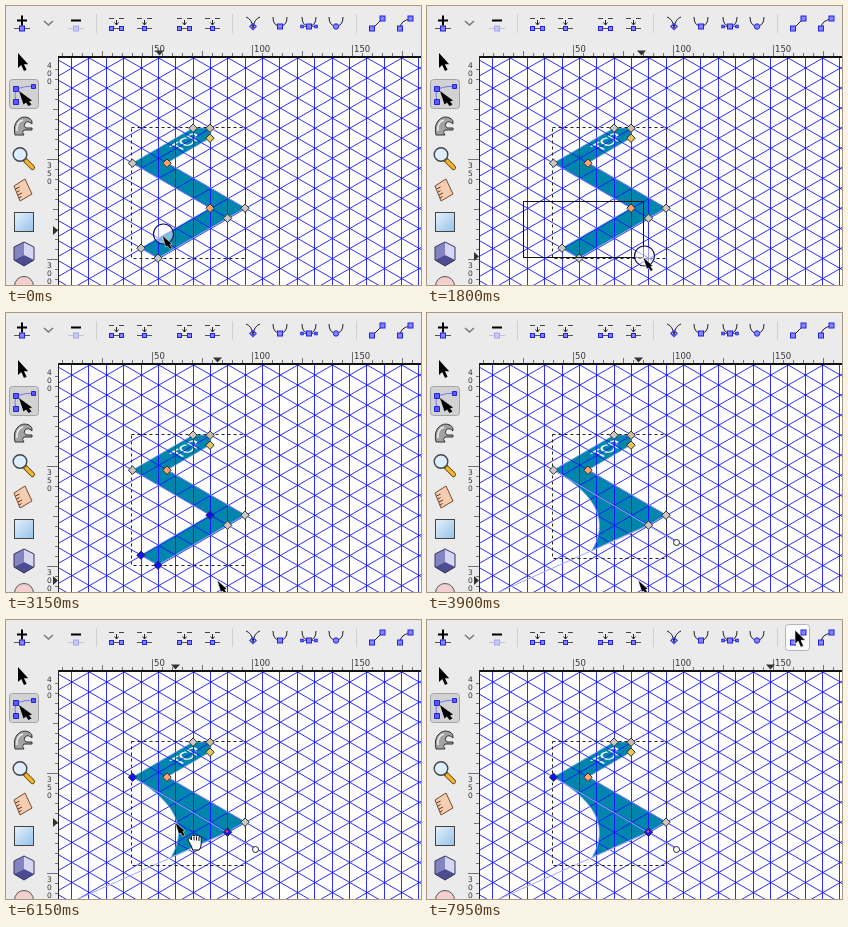
Write an HTML page that moves like this. It is 415x279 px and loops after 8000 ms.

```html
<!DOCTYPE html>
<html lang="en">
<head>
<meta charset="utf-8">
<title>Editing nodes on an axonometric grid</title>
<style>
html, body { margin: 0; width: 100%; height: 100%; overflow: hidden; background: #ebebeb; }
svg { display: block; width: 415px; height: 279px; }
text { font-family: "DejaVu Sans", sans-serif; }
</style>
</head>
<body>
<svg id="stage" viewBox="0 0 415 279" xmlns="http://www.w3.org/2000/svg">
  <defs>
    <clipPath id="view"><rect x="53" y="51" width="362" height="228"/></clipPath>
    <linearGradient id="sky" x2="1" y2="1"><stop stop-color="#e6f1fb"/><stop offset="1" stop-color="#94c2ea"/></linearGradient>
  </defs>
  <rect width="415" height="279" fill="#ebebeb"/>
  <rect x="53" y="51" width="362" height="228" fill="#fff"/>
  <g clip-path="url(#view)">
    <path id="ribbon" fill="#0085ad"/>
    <text transform="matrix(.87 -.5 .87 .5 185 138.700)" text-anchor="middle" font-size="15" fill="#fff" stroke="#fff" stroke-width=".3">TCP</text>
    <path id="grid" fill="none" stroke="#1212ff" stroke-opacity=".88"/>
    <path id="outline" fill="none" stroke="#8fa2f2" stroke-opacity=".75"/>
    <g id="handles" fill="none" stroke="#a3a6f5">
      <path d="M126.500 157L249 229M222 212L62 283.500"/>
      <circle cx="249.500" cy="229.500" r="3" fill="#fff" stroke="#222"/>
    </g>
    <rect id="bounds" x="125.500" y="121.500" width="114" fill="none" stroke="#222" stroke-dasharray="3 3"/>
    <g id="nodes"></g>
    <rect id="band" x="96.500" y="195.500" fill="none" stroke="#111"/>
  </g>
  <g id="rulers"></g>
  <path id="markX" d="M-4.500 -5.500h9l-4.500 5z" fill="#333"/>
  <path id="markY" d="M-5 -4.500v9l5 -4.500z" fill="#333"/>
  <g id="bar"></g>
  <g id="tools">
    <path d="M12 47v15l3.200 -3 2.800 6 2.600 -1.200 -2.700 -5.600h4.300z" fill="#000"/>
    <rect x="3.500" y="73.500" width="29" height="29" rx="3" fill="#d2d2d2" stroke="#a4a4a4"/>
    <path d="M10 96q-2 -7 0 -13q9 -3 18 -3" fill="none" stroke="#7777e8"/>
    <path d="M7.500 80.500h5v5h-5zM25.500 78.500h4v4h-4zM7.500 93.500h5v5h-5z" fill="#5a5aff" stroke="#2222d0"/>
    <path d="M13 85l13 9.500 -3 1 2.500 3 -3 1.500 -2.500 -3.500 -2.500 2z" fill="#000"/>
    <path d="M9 129q-2 -9 2 -14q5 -6 12 -3q4 2 3 6q-4 -4 -7 -1q-2 3 1 5h6v2h-8q-3 2 0 5z" fill="#a2a2a2" stroke="#333"/>
    <path d="M11 125q-1 -9 6 -11" fill="none" stroke="#eee" stroke-width="1.500"/>
    <path d="M19 154l7.500 7.500" stroke="#5f4510" stroke-width="5" stroke-linecap="round"/>
    <path d="M20 155l6.500 6.500" stroke="#f4b62c" stroke-width="3.200" stroke-linecap="round"/>
    <circle cx="14" cy="148.500" r="6.800" fill="#dceeff" stroke="#444" stroke-width="1.400"/>
    <path d="M8 180l11 -7 7 15 -12 7z" fill="#f5cdb0" stroke="#7b4a2c"/>
    <path d="M9.500 183l4 -2M11 186l2.500 -1.500M12 189l4 -2M13 192l2.500 -1.500" stroke="#5d3520"/>
    <rect x="8.500" y="206.500" width="19" height="19" fill="url(#sky)" stroke="#444"/>
    <path d="M18 236l10 5v13l-10 6 -10 -6v-13z" fill="#d6d6f2"/>
    <path d="M18 236v13l-10 5v-13z" fill="#8484c0"/>
    <path d="M18 249l10 5 -10 6 -10 -6z" fill="#4c4c90"/>
    <path d="M18 236l10 5v13l-10 6 -10 -6v-13z" fill="none" stroke="#34345c"/>
    <circle cx="18" cy="280" r="9.500" fill="#f4cfcf" stroke="#555"/>
  </g>
  <circle id="press" r="10" fill="#fff" fill-opacity=".5" stroke="#15155e" stroke-width="1.200"/>
  <g id="cursor">
    <path id="dart" d="M0 0L10 9 7.800 9.600 10 13 7.800 14.300 5.600 11 3.800 12z" fill="#000" stroke="#fff" stroke-width=".5"/>
    <path id="hand" d="M14 20q-2 -4 .5 -4l2 2v-4q1.200 -2 2.500 0q1.200 -2 2.500 0q1.500 -1.500 2.500 .5q2.200 -1 2.200 1.500v6q0 3 -2 6h-6.500q-1 -4 -3.700 -8zM19 14.500v4M21.500 14.500v4M24 15v4" fill="#fff" stroke="#111"/>
    <path id="pointer" d="M0 0v14l3.200 -2.800 2.500 6 2.800 -1.200 -2.500 -5.700h4.500z" fill="#000" stroke="#fff" stroke-width=".6"/>
  </g>
</svg>
<script>
const LOOP = 8000, STEP = 150;
const $ = id => document.getElementById(id);
const set = (el, attrs) => { for (const k in attrs) el.setAttribute(k, attrs[k]); return el; };
const add = (parent, tag, attrs) =>
  parent.appendChild(set(document.createElementNS("http://www.w3.org/2000/svg", tag), attrs));
const show = (id, on) => $(id).setAttribute("visibility", on ? "visible" : "hidden");
const move = (id, x, y) => $(id).setAttribute("transform", `translate(${x} ${y})`);

function drawGrid() {
  const dx = 17.36, dy = 20.05, slope = dy / dx / 2;
  let d = "";
  for (let x = 152.4 - 5 * dx; x < 415; x += dx) d += `M${Math.floor(x) + .5} 51V279`;
  for (let i = -28; i < 16; i++) {
    const y = 242.5 + i * dy;
    for (const s of [slope, -slope]) d += `M53 ${y - 82.5 * s}L415 ${y + 279.5 * s}`;
  }
  $("grid").setAttribute("d", d);
}

function drawRulers() {
  const g = $("rulers"), label = { fill: "#333" };
  let d = "";
  for (let i = -9; i < 28; i++) {
    const len = i % 10 === 0 ? 11 : i % 5 === 0 ? 5 : 3;
    d += `M${146.5 + i * 10} 50v${-len}`;
    if (i < 13) d += `M52 ${153.5 + i * 10}h${-len}`;
  }
  add(g, "path", { d, stroke: "#666", "stroke-width": .9 });
  add(g, "rect", { x: 0, y: 0, width: 37, height: 279, fill: "#ebebeb" });
  add(g, "rect", { x: 0, y: 0, width: 415, height: 37, fill: "#ebebeb" });
  add(g, "path", { d: "M52 51H415", stroke: "#111", "stroke-width": 2 });
  add(g, "path", { d: "M52.5 50V279", stroke: "#222" });
  [50, 100, 150].forEach((n, i) =>
    add(g, "text", { x: 148 + i * 100, y: 45.5, "font-size": 8.5, ...label }).textContent = n);
  ["400", "350", "300"].forEach((n, i) => [...n].forEach((c, j) =>
    add(g, "text", { x: 43.5, y: 62 + i * 100 + j * 8, "font-size": 7.5, "text-anchor": "middle", ...label }).textContent = c));
}

function drawBar() {
  const g = $("bar");
  const line = (d, stroke = "#222", w = 1) => add(g, "path", { d, stroke, "stroke-width": w, fill: "none" });
  const box = (x, y, s = 5, fill = "#8585ff", stroke = "#2222e0") =>
    add(g, "rect", { x: x - s / 2, y: y - s / 2, width: s, height: s, fill, stroke });
  [90.5, 226.5, 350.5].forEach(x => line(`M${x} 8v19`, "#d0d0d0"));
  for (const x of [371, 399])
    add(g, "rect", { id: "hover" + x, x: x - 12.5, y: 4.5, width: 24, height: 26, rx: 3, fill: "#fafafa", stroke: "#b5b5b5" });
  line("M8 22.5h16", "#555");
  box(16, 22.5);
  line("M11 14.5h10M16 9.5v10", "#000", 2);
  line("M62 22.5h16", "#c4c4dc");
  box(70, 22.5, 5, "#c8c8fa", "#a6a6f0");
  line("M65 14.5h10", "#000", 2);
  line("M38 15l4.500 4 4.500 -4", "#777", 1.5);
  [110, 138, 178, 206].forEach((x, i) => {
    line(`M${x - 7} 12.500h5M${x + 3} 12.500h5`, "#444");
    line(`M${x + .5} 14v5M${x - 1.5} 16.500l2 2.500 2 -2.500`);
    line(`M${x - 7} 22.500h15`, "#555");
    if (i % 2) box(x + .5, 22.5, 4);
    else box(x - 4.5, 22.5, 4), box(x + 5.5, 22.5, 4);
  });
  [247, 274, 303, 330].forEach((x, i) => {
    line(i ? `M${x - 7} 11q0 9 7 9q7 0 7 -9` : `M${x - 7} 11q6 2 7 11q1 -9 7 -11`);
    if (i === 2) { line(`M${x - 7} 20.500h14`, "#5b5bd8"); box(x - 7, 20.5, 2.5); box(x + 7, 20.5, 2.5); }
    if (i === 3) add(g, "circle", { cx: x, cy: 20.5, r: 2.7, fill: "#8585ff", stroke: "#2222e0" });
    else if (i) box(x, 20.5);
    else line(`M${x} 17.500l3 3 -3 3 -3 -3z`, "#4141e8", 1.5);
  });
  line("M366 23l10 -10");
  line("M394 23q0 -9 11 -10");
  for (const x of [366, 394]) { box(x, 22.5); box(x + 10.5, 12.5); }
}

// x, y, colour
const GREY = "#c9c9c4", ORANGE = "#ffa56b";
const nodes = [
  [187, 122, GREY], [204, 122, "#c9bda0"], [204, 132, "#e6c65a"], [161, 157, ORANGE], [239, 202, GREY],
  [221.5, 212, GREY], [152, 252, GREY], [135, 242, GREY], [204, 202, ORANGE], [126.5, 157, GREY]
].map(([x, y, fill]) => ({
  x, y, fill,
  el: add($("nodes"), "path", { d: `M${x} ${y - 4}l4.200 4.200 -4.200 4.200 -4.200 -4.200z`, stroke: "#333" })
}));
const joined = nodes.map(n => [n.x, n.y]);
const before = `M${joined.join("L")}Z`;
const after = `M${joined.slice(0, 6).join("L")}L165 237.500C177 217 181 188 126.500 157Z`;
const isCut = i => i > 5 && i < 9;
const isEnd = i => i === 5 || i === 9;

// time, x, y of the cursor tip
const track = [
  [-15, 152, 221], [0, 156, 229], [150, 168, 242], [300, 178, 246], [450, 151, 230], [750, 105, 200],
  [900, 96, 195], [1340, 96, 195], [1500, 130, 212], [1650, 180, 236], [1800, 216, 251], [2100, 229, 263],
  [2400, 224, 267], [2550, 218, 267], [2850, 211, 267], [4500, 211, 267], [4950, 194, 239], [5250, 174, 209],
  [5400, 174, 209], [5700, 169, 202], [6900, 169, 202], [7050, 205, 168], [7350, 316, 64], [7500, 343, 50],
  [7650, 372, 28], [7800, 394, 14], [7950, 368, 10]
];
function cursorAt(t) {
  const i = track.findIndex(k => k[0] >= t);
  if (i < 1) return track[i ? track.length - 1 : 0].slice(1);
  const [t0, x0, y0] = track[i - 1], [t1, x1, y1] = track[i];
  const p = (t - t0) / (t1 - t0);
  return [x0 + (x1 - x0) * p, y0 + (y1 - y0) * p];
}

function render(time) {
  const t = Math.floor(time / STEP) * STEP;
  const within = (a, b) => t >= a && t < b;
  const [x, y] = cursorAt(t).map(Math.round);
  const [mx, my] = cursorAt(Math.min(t - 10, 7500));
  const cut = t >= 3900, dragging = within(1350, 3150);

  $("ribbon").setAttribute("d", cut ? after : before);
  $("outline").setAttribute("d", cut ? after : before);
  $("bounds").setAttribute("height", cut ? 124 : 131);
  show("handles", cut);
  nodes.forEach((n, i) => {
    const picked = isCut(i) ? t >= 3150 : isEnd(i) && t >= 6150;
    n.el.setAttribute("fill", picked ? "#1010ff" : n.fill);
    n.el.setAttribute("visibility", cut && isCut(i) ? "hidden" : "visible");
  });
  show("core", t >= 6150);

  show("band", dragging);
  set($("band"), { width: Math.max(0, x - 96), height: Math.max(0, y - 195) });
  show("press", within(0, 150) || dragging || within(6000, 6150));
  move("press", x + 1.5, y - 1);

  move("cursor", x, y);
  const onBar = y < 38;
  show("dart", !onBar);
  show("pointer", onBar);
  show("hand", within(5550, 7050));
  show("hover371", onBar && x < 386);
  show("hover399", onBar && x >= 386);

  move("markX", Math.round(mx) + .5, 50);
  move("markY", 52, Math.round(my) + .5);
  show("markY", my > 52);
}

drawGrid();
drawRulers();
drawBar();
add($("nodes"), "circle", { id: "core", cx: 221, cy: 211.5, r: 1.2, fill: "#ff4a6a" });

const start = performance.now();
function tick() {
  render((performance.now() - start) % LOOP);
  requestAnimationFrame(tick);
}
tick();
</script>
</body>
</html>
```
